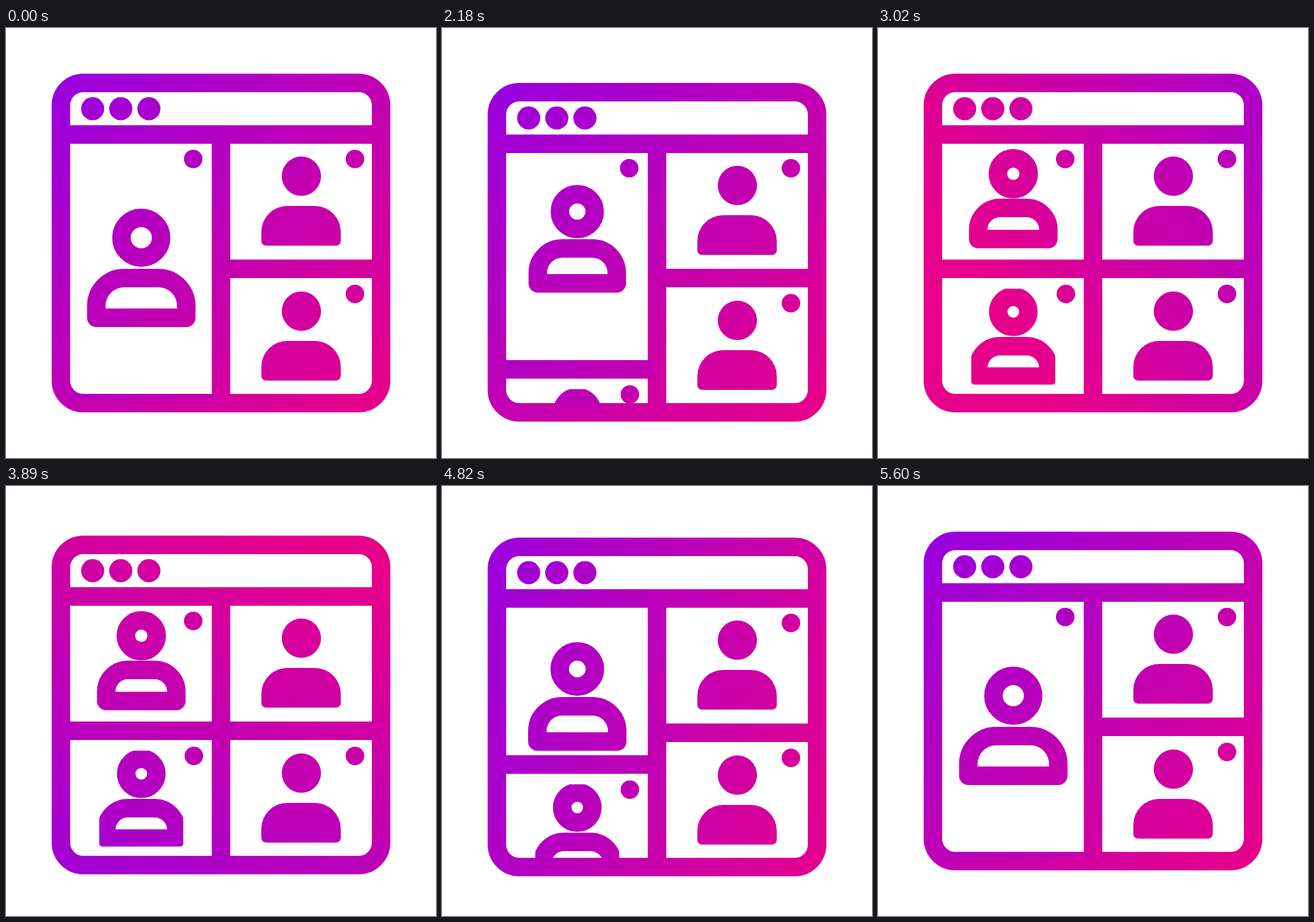
An HTML page with a canvas for the animation above (5630 ms loop, 650 px wide and 650 px high).

```html
<!DOCTYPE html>
<html lang="en">
<head>
<meta charset="utf-8">
<title>Video call window</title>
<style>
  html, body { margin: 0; width: 100%; height: 100%; overflow: hidden; background: #fff; }
  canvas { display: block; width: 650px; height: 650px; }
</style>
</head>
<body>
<canvas id="stage" width="650" height="650"></canvas>
<script>
const ctx = document.getElementById('stage').getContext('2d');
const LOOP = 5630, STEP = 30, LINE = 28;
const OPEN = 2000, SPIN = 3260, CLOSE = 4685;

const lerp = (a, b, p) => a + (b - a) * p;
const span = (t, start, length) => Math.min(1, Math.max(0, (t - start) / length));
const sineInOut = s => (1 - Math.cos(Math.PI * s)) / 2;
const sineOut = s => Math.sin(Math.PI * s / 2);
const quadOut = s => 1 - (1 - s) ** 2;
const cubicInOut = s => s < 0.5 ? 4 * s ** 3 : 1 - 4 * (1 - s) ** 3;
const spinEase = s => s * s * (2.16 - 1.16 * s);

// Quick push down followed by a softer return.
function bounce(t, start, height, rise, fall) {
  return height * sineInOut(span(t, start, rise))
    * (1 - sineOut(span(t, start + rise, fall)));
}

function blinkOff(t, times) {
  return times.some(start => t >= start && t < start + 200);
}

function gradient(t) {
  const a = cubicInOut(span(t, OPEN, 1140));
  const b = spinEase(span(t, SPIN, 900));
  const c = sineInOut(span(t, 4670, 930));
  const angle = (45 + 103 * a + 230 * b + 27 * c) * Math.PI / 180;
  const shift = 0.25 * a * (1 - b);
  const length = 680;
  const dx = Math.cos(angle) * length, dy = Math.sin(angle) * length;
  const from = -0.5 - shift, to = 0.5 - shift;
  const g = ctx.createLinearGradient(325 + dx * from, 325 + dy * from,
                                     325 + dx * to, 325 + dy * to);
  g.addColorStop(0, '#9a00dd');
  g.addColorStop(1, '#e6008a');
  return g;
}

function disc(x, y, r) {
  ctx.beginPath();
  ctx.arc(x, y, r, 0, Math.PI * 2);
  ctx.fill();
}

function solidPerson(y) {
  disc(446.5, y + 30, 29.7);
  ctx.beginPath();
  ctx.roundRect(386, y + 75, 120, 60, [39, 39, 7, 7]);
  ctx.fill();
}

function outlinePerson(headY, headR, bodyY, width, height) {
  const x = 204.5, corner = width * 0.31;
  ctx.beginPath();
  ctx.arc(x, headY, headR, 0, Math.PI * 2);
  ctx.stroke();
  ctx.beginPath();
  ctx.roundRect(x - width / 2, bodyY, width, height, [corner, corner, 0, 0]);
  ctx.stroke();
}

function lowerPanel(shift) {
  ctx.save();
  ctx.beginPath();
  ctx.rect(90, 160, 230, 400);
  ctx.clip();
  ctx.translate(0, shift);
  ctx.fillRect(97, 350, 228, LINE);
  disc(284, 402, 14);
  ctx.beginPath();
  ctx.roundRect(141, 394, 127, 145, 4);
  ctx.clip();
  outlinePerson(429, 22.8, 481, 106, 46);
  ctx.restore();
}

function draw(t) {
  const split = sineInOut(span(t, OPEN, 470)) - sineInOut(span(t, CLOSE, 418));
  const shrink = quadOut(span(t, 2015, 497)) - quadOut(span(t, 4678, 497));
  const drop = Math.round(
    bounce(t, OPEN, 21, 290, 500) +
    bounce(t, 3740, 6, 150, 270) +
    bounce(t, CLOSE, 21, 290, 500));

  ctx.setTransform(1, 0, 0, 1, 0, 0);
  ctx.fillStyle = '#fff';
  ctx.fillRect(0, 0, 650, 650);
  ctx.translate(0, drop);
  ctx.fillStyle = ctx.strokeStyle = gradient(t);
  ctx.lineWidth = LINE;
  ctx.lineJoin = 'round';

  ctx.beginPath();
  ctx.roundRect(83, 83, 484, 484, 34);
  ctx.stroke();
  ctx.fillRect(90, 147, 470, LINE);
  ctx.fillRect(311, 160, LINE, 400);
  ctx.fillRect(330, 350, 230, LINE);
  for (const x of [131, 173.5, 216]) disc(x, 122, 17.5);

  solidPerson(194);
  solidPerson(398);
  outlinePerson(lerp(317, 220.3, shrink), lerp(30, 23.3, shrink),
                lerp(378, 272, shrink), lerp(136, 106, shrink), lerp(60, 47, shrink));

  disc(527.5, 402, 14);
  if (!blinkOff(t, [3700, 4100, 4500])) disc(527.5, 198, 14);
  if (!blinkOff(t, [4700, 5100])) disc(283, 198, 14);

  lowerPanel(Math.round(203 * (1 - split)));
}

const begin = performance.now();
function tick() {
  const time = (performance.now() - begin) % LOOP;
  draw(Math.floor((time - 20) / STEP) * STEP + 20);
  requestAnimationFrame(tick);
}
tick();
</script>
</body>
</html>
```
